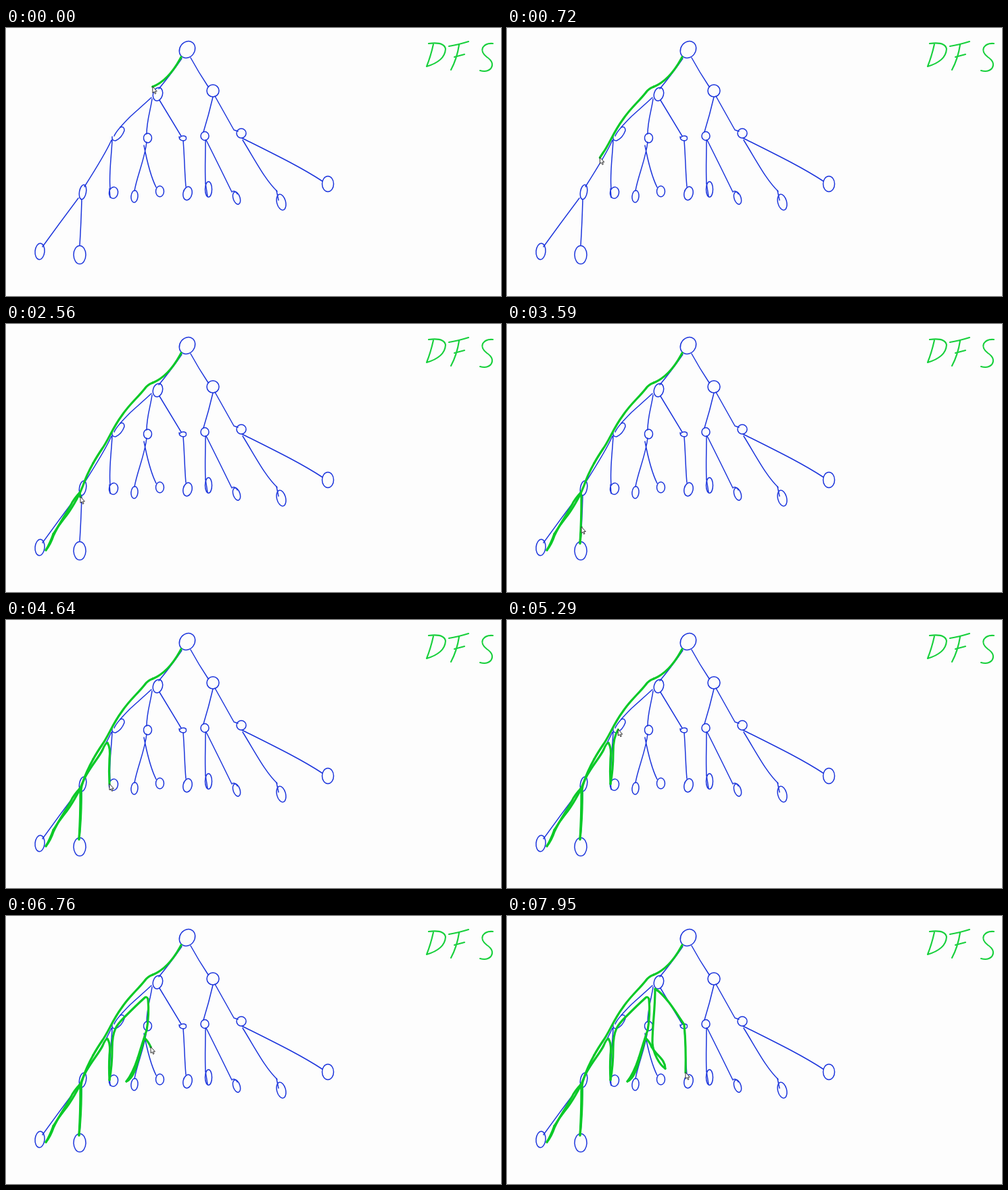
These frames come from a looping animation (732x397 px, 7.99 s). An HTML page:

```html
<!DOCTYPE html>
<html lang="en">
<head>
<meta charset="utf-8">
<title>Depth-first search</title>
<style>
html, body { margin: 0; width: 100%; height: 100%; overflow: hidden; background: #fdfdfd; }
svg { display: block; width: 100%; height: 100%; }
path, ellipse { fill: none; stroke-linecap: round; stroke-linejoin: round; }
#tree { stroke: #1c35dc; stroke-width: 1.5; }
#label { stroke: #18d03c; stroke-width: 2.1; }
#trail { stroke: #0bc928; stroke-width: 3.2; }
#cursor { fill: #fff; stroke: #333; stroke-width: 1; stroke-linejoin: miter; }
</style>
</head>
<body>
<svg viewBox="0 0 732 397">
  <g id="tree">
    <path d="M260 45Q246 66 226 90M273 44Q285 66 299 87"/>
    <path d="M215 103Q203 114 184 131Q163 152 160 160M216 105C214 121 208 137 208 157M227 107L259 160"/>
    <path d="M306 102Q300 128 292 154M309 101L337 151L343 153"/>
    <path d="M156 166C148 184 130 213 116 235M157 166C156 190 152 215 154 238"/>
    <path d="M208 169C205 195 194 218 190 241M204 174C209 200 215 222 222 236"/>
    <path d="M262 167C264 190 264 214 266 235M295 166C295 190 294 210 295 230M296 166Q316 206 334 243"/>
    <path d="M350 166C372 202 383 224 401 242M349 163C397 187 436 206 468 227"/>
    <path d="M107 252Q80 288 54 324M112 254Q111 290 109 322"/>
    <path d="M169 147Q175 145 175 152Q171 163 162 167Q156 167 157 161"/>
    <path d="M256 161Q256 167 263 167Q268 166 266 161Q261 158 257 162"/>
    <path d="M153 238L154 251M295 230L298 249M335 242Q340 241 342 246M400 241L403 255"/>
  </g>
  <g id="label">
    <path d="M632 24Q628 42 622 57M625 23Q648 20 650 31Q649 49 622 57"/>
    <path d="M655 27Q668 25 684 20M670 25Q667 45 658 62M663 43L678 39"/>
    <path d="M720 23Q709 22 705 29Q702 36 711 43Q723 51 717 60Q711 66 701 63"/>
  </g>
  <g id="trail"></g>
  <path id="cursor" d="M0 0V9L2 7.3L3.6 10.6L5 9.8L3.5 6.8H6Z"/>
</svg>
<script>
const LOOP = 7990;
const NS = 'http://www.w3.org/2000/svg';
const $ = id => document.getElementById(id);

function add(parent, tag, attrs) {
  const el = document.createElementNS(NS, tag);
  for (const key in attrs) el.setAttribute(key, attrs[key]);
  return parent.appendChild(el);
}

// cx, cy, rx, ry, tilt
const nodes = [
  [268, 32, 11, 13, 35], [224.5, 98, 7, 10, 15], [306, 93, 9, 9, 0],
  [209.5, 163, 6, 7, 0], [294, 160, 6, 6.5, 0], [348, 156, 7, 7, 0],
  [113.5, 243, 5, 11, 10], [159, 244, 6.5, 8.5, 10], [190, 249.5, 5, 9, 5],
  [227.5, 242, 6, 8, 0], [268.5, 245, 6.5, 10, 12], [299.5, 239, 5, 11.5, 0],
  [341, 252, 5, 9.5, -18], [407, 258, 6.5, 12, -14], [476, 231, 8.5, 11.5, 0],
  [50, 331, 7, 12, 5], [109, 336, 9, 13.5, 0]
];
for (const [cx, cy, rx, ry, tilt] of nodes)
  add($('tree'), 'ellipse', { cx, cy, rx, ry, transform: `rotate(${tilt} ${cx} ${cy})` });

// Pen legs: start time, end time, path
const legs = [
  [-1, 0, 'M259 43C250 60 237 79 217 87'],
  [0, 810, 'M217 87Q209 90 205 96C194 110 183 118 171 136C157 155 152 171 142 185Q134 197 129 206'],
  [810, 1420, 'M129 206Q119 224 114 239C108 255 96 276 86 288Q78 298 70 311'],
  [1420, 1740, 'M70 311Q65 325 59 335'],
  [1740, 2460, 'M59 335Q66 326 70 314C78 295 93 276 98 264Q103 256 109 250'],
  [2460, 2560, 'M109 250L110 256'],
  [2560, 3300, 'M110 256Q110 292 108 325'],
  [3440, 3900, 'M108 325Q112 285 111 251'],
  [3900, 4300, 'M111 251C114 228 136 207 143 192Q147 182 150 182'],
  [4300, 4640, 'M150 182Q155 189 153 206Q152 224 153 243'],
  [5000, 5520, 'M153 243Q157 222 157 196C157 168 164 161 176 149Q193 132 204 122Q208 118 210 123'],
  [5520, 5800, 'M210 123Q212 147 208 169'],
  [5800, 5990, 'M208 169Q202 187 195 210'],
  [5990, 6180, 'M195 210Q187 234 178 245'],
  [6220, 6620, 'M178 245C192 240 196 207 205 181'],
  [6620, 6760, 'M205 181Q210 185 214 194'],
  [6760, 7010, 'M214 194C221 207 234 212 234 226'],
  [7010, 7440, 'M234 226C225 220 216 203 215 188C215 160 219 141 219 108'],
  [7460, 7700, 'M219 108C233 116 247 138 262 161'],
  [7700, 7950, 'M262 161Q265 192 264 232']
].map(([start, end, d]) => {
  const el = add($('trail'), 'path', { d });
  const len = el.getTotalLength();
  return { start, end, el, len };
});

function draw(t) {
  let tip;
  for (const { start, end, el, len } of legs) {
    const p = Math.min(1, Math.max(0, (t - start) / (end - start)));
    el.style.display = p > 0 ? '' : 'none';
    el.style.strokeDasharray = p < 1 ? `${len * p} ${len + 10}` : 'none';
    if (p > 0) tip = el.getPointAtLength(len * p);
  }
  $('cursor').setAttribute('transform', `translate(${tip.x} ${tip.y})`);
}

const begin = performance.now();
function tick() {
  draw((performance.now() - begin) % LOOP);
  requestAnimationFrame(tick);
}
tick();
</script>
</body>
</html>
```
